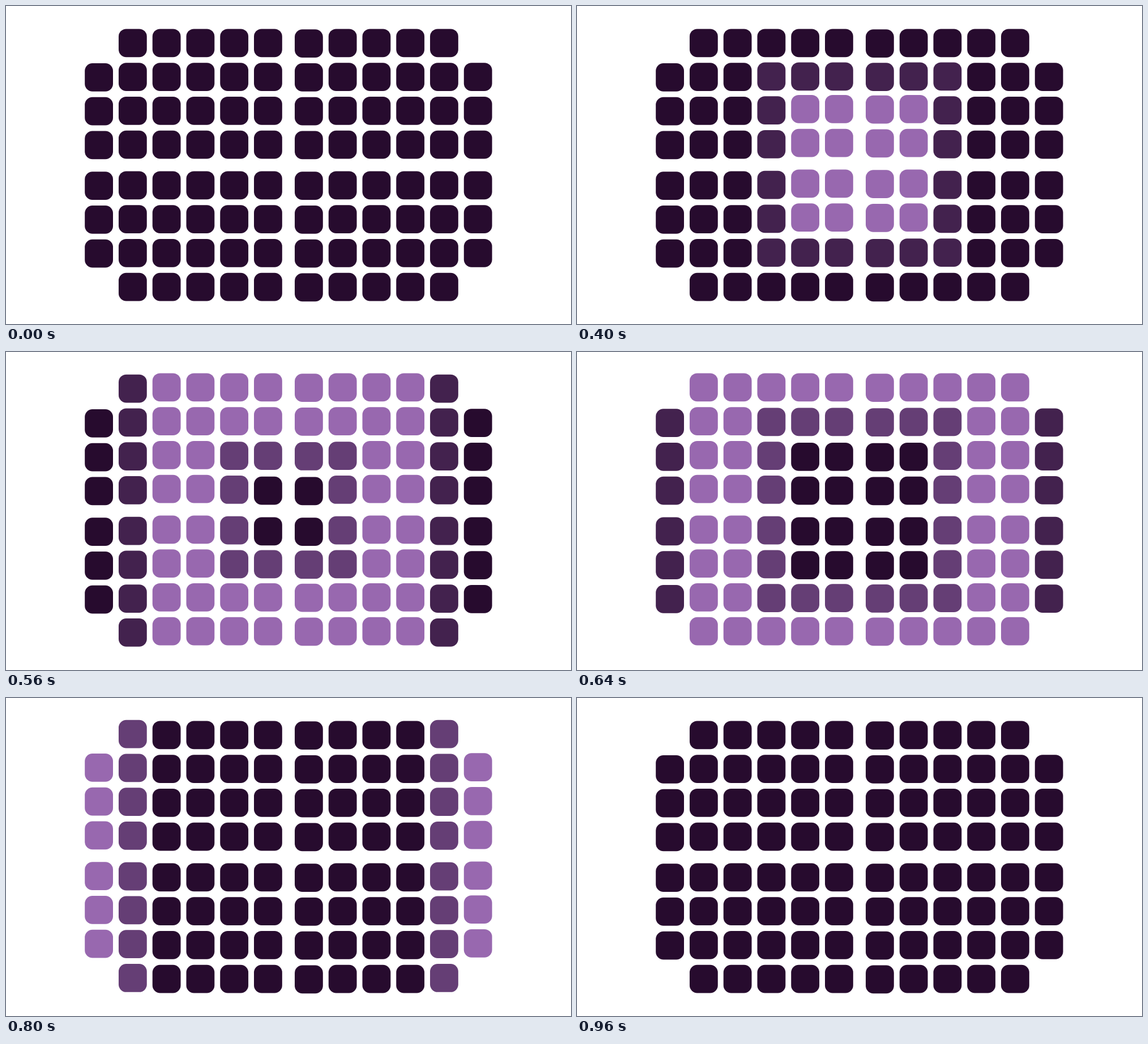
Animation, 998 px wide and 561 px high, one loop 1400 ms. Source, as an HTML page with a canvas:

```html
<!DOCTYPE html>
<html lang="en">
<head>
<meta charset="utf-8">
<title>Tile ripple</title>
<style>
  html, body { margin: 0; width: 100%; height: 100%; overflow: hidden; background: #fff; }
  canvas { display: block; }
</style>
</head>
<body>
<canvas id="stage" width="998" height="561"></canvas>
<script>
  const ctx = document.getElementById('stage').getContext('2d');

  const LOOP = 1400, TICK = 40, START = 240, RING_DELAY = 80;
  const PITCH = 59.76, SIZE = 49.8, RADIUS = 13.5, LIFT = 3;
  const DARK = [39, 11, 46], LIGHT = [152, 104, 175];

  // Glow of a tile at each tick after the wave reaches its ring
  const GLOW = [0.25, 0.74, 1, 1, 1, 0.86, 0.55, 0.17];

  const tiles = [];
  for (let row = 0; row < 8; row++) {
    for (let col = 0; col < 12; col++) {
      const dx = col < 6 ? 5 - col : col - 6;
      const dy = row < 4 ? 3 - row : row - 4;
      if (dx === 5 && dy === 3) continue;
      const sag = col === 0 || col === 6 ? 0.8 : 0;
      tiles.push({
        x: col < 6 ? 139.2 + col * PITCH : 510 + (col - 6) * PITCH,
        y: (row < 4 ? 40.4 + row * PITCH : 291.4 + (row - 4) * PITCH) + sag,
        ring: Math.max(dx, dy)
      });
    }
  }

  function mix(k) {
    return `rgb(${DARK.map((c, i) => Math.round(c + (LIGHT[i] - c) * k)).join(',')})`;
  }

  function draw(time) {
    ctx.fillStyle = '#fff';
    ctx.fillRect(0, 0, 998, 561);
    for (const { x, y, ring } of tiles) {
      const age = Math.floor((time - START - ring * RING_DELAY) / TICK);
      const glow = GLOW[age] || 0;
      ctx.fillStyle = mix(glow);
      ctx.beginPath();
      ctx.roundRect(x, y - LIFT * glow, SIZE, SIZE, RADIUS);
      ctx.fill();
    }
  }

  const begin = performance.now();
  function frame() {
    draw((performance.now() - begin) % LOOP);
    requestAnimationFrame(frame);
  }
  frame();
</script>
</body>
</html>
```
